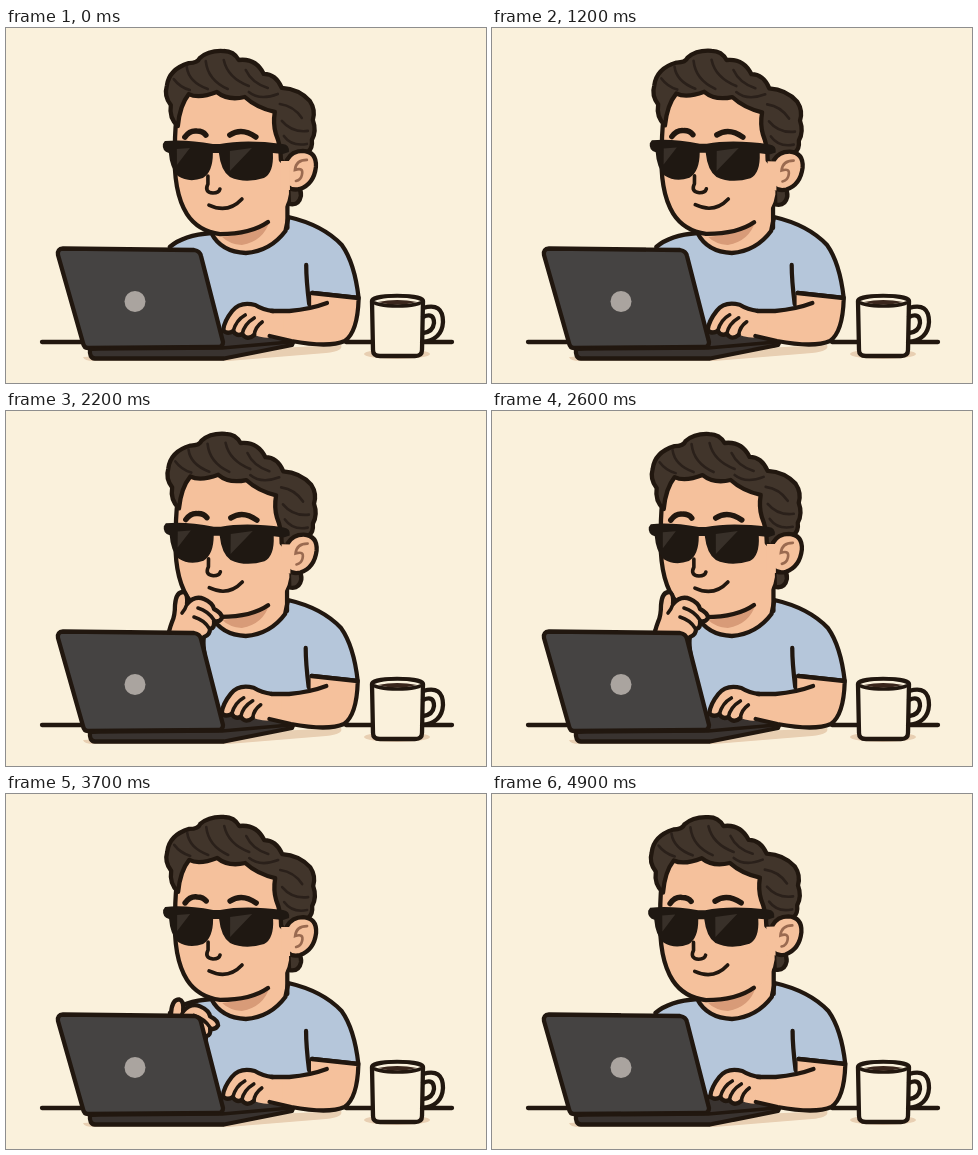
Write an HTML page that moves like this. It is 480 by 355 pixels and loops after 5 s.

```html
<!DOCTYPE html>
<html lang="en">
<head>
<meta charset="utf-8">
<title>Thinking at the laptop</title>
<style>
html, body { margin: 0; width: 100%; height: 100%; overflow: hidden; background: #faf1dc; }
svg { display: block; width: 100%; height: 100%; }
.ink { stroke: #21170f; stroke-width: 4.3; stroke-linecap: round; stroke-linejoin: round; }
.thin { stroke-width: 3.6; }
.brow { stroke-width: 5.5; }
.line { fill: none; }
.skin { fill: #f5c19c; }
.shirt { fill: #b5c6da; }
.hair { fill: #41352b; }
.cup { fill: #faf1dc; }
.dark { fill: #1f1812; }
.shade { fill: #d89b78; }
.shadow { fill: #e8cfb2; }
.strand { fill: none; stroke: #2a201a; stroke-width: 2.6; stroke-linecap: round; }
</style>
</head>
<body>
<svg viewBox="0 0 480 355">
  <path class="shadow" d="M77 329L335 317Q338 323 320 325L222 333H88Q78 333 77 329Z"/>
  <ellipse class="shadow" cx="391" cy="326" rx="33" ry="5"/>
  <path class="ink line" d="M36 314H80M340 314H446"/>

  <g class="body">
    <path class="skin" d="M204 160H282V206Q260 228 238 226Q216 222 204 200Z"/>
    <path class="shade" d="M216 209Q248 206 264 193Q258 213 236 217Q223 216 216 209Z"/>
    <path class="shirt ink" d="M163 219Q177 207 205 205Q215 224 240 225Q265 223 280 203L283 189Q318 197 337 217Q350 235 354 270L307 265L306 312H190Z"/>
    <path class="ink line" d="M282 174V200M301 237Q301 252 304 276"/>
  </g>

  <g id="head">
    <path class="hair ink" d="M282 150Q296 158 295 168Q293 178 283 176Z"/>
    <path class="skin" d="M176 55Q169 98 169 120Q167 164 181 186Q192 203 214 206Q246 207 270 190Q281 181 283 166V70Z"/>
    <path class="ink line" d="M172 80Q169 98 169 120Q167 164 181 186Q192 203 214 206Q245 206 262 194"/>
    <path class="hair ink" d="M172 98Q163 90 165 77Q158 68 161 58Q163 41 183 35Q192 35 194 30Q203 22 218 23Q228 23 233 32Q250 30 258 46Q270 46 276 60Q293 61 304 73Q310 82 307 92Q311 103 306 112Q307 120 302 124H292L281 138L275 132Q275 118 270 106Q267 96 269 84Q251 80 239 69Q222 73 211 64Q193 71 183 66Q174 77 172 98Z"/>
    <path class="strand" d="M168 51Q174 59 184 62M181 39Q183 54 202 61M200 33Q202 52 222 61M218 32Q222 50 243 58M240 42Q246 55 262 60M243 64Q254 73 272 66M274 76Q288 78 296 90M276 93Q286 105 302 103M278 108Q286 119 301 116"/>
    <path class="skin ink" d="M281 132Q286 123 297 123Q311 124 310 139Q308 156 294 161Q286 163 281 158Z"/>
    <path class="skin" d="M275 133H284V162H275Z"/>
    <path class="line" stroke="#9a6a50" stroke-width="2.6" stroke-linecap="round" d="M301 132Q290 132 289 142Q298 139 296 147Q295 152 290 153"/>
    <path class="ink line brow" d="M179 109Q184 102 191 103Q197 103 200 107M224 107Q236 99 250 109"/>
    <path class="dark" d="M159 113Q180 111 207 116H214Q239 111 277 116Q284 117 283 124L277 126L267 125Q268 145 258 150Q239 156 224 149Q215 143 213 125H207Q207 144 197 150Q183 155 172 148Q164 140 163 125Q156 123 157 116Z"/>
    <path fill="#383029" d="M171 121L184 120L171 137ZM224 123L246 120L224 143Z"/>
    <path class="ink line thin" d="M202 148V156Q198 164 207 165Q213 165 214 161M203 177Q222 186 236 171"/>
  </g>

  <g id="chinHand">
    <path class="skin ink" d="M158 260Q160 226 166 211Q169 205 169 194Q170 181 177 181Q182 182 181 193Q189 184 198 188Q207 192 208 198Q216 202 216 207Q213 212 208 210Q209 217 204 218Q204 224 198 226Q196 234 202 262Z"/>
    <path class="ink line thin" d="M181 193Q179 199 176 202M192 197Q202 200 208 209M188 206Q198 209 203 217"/>
  </g>

  <path class="ink cup" d="M366 273Q366 268 391 268Q417 268 417 273L416 322Q416 328 409 328H374Q367 328 367 322Z"/>
  <ellipse class="ink thin cup" cx="391.500" cy="273" rx="25" ry="5"/>
  <path fill="#3a261c" d="M372 274Q391 270 411 274Q391 279 372 274Z"/>
  <path class="ink line" d="M417 280Q437 274 437 294Q436 312 416 314M417 289Q428 284 428 295Q427 304 417 305"/>

  <path class="ink" fill="#393330" d="M84 321L210 303H284Q289 312 286 317L218 330.500H89Q83 330 84 321Z"/>
  <path class="ink" fill="#454342" d="M57 220.500L188 222Q194 223 195 228L217 314Q217 319 212 319L82 320Q78 320 77 315L52 227Q51 221 57 220.500Z"/>
  <path class="ink line thin" d="M85 321L216 320L284 314"/>
  <circle cx="129" cy="273.500" r="10.500" fill="#aaa49f"/>

  <g class="body">
    <path class="skin" d="M306 265L354 271Q353 304 340 313Q324 320 286 313L262 309L262 283Q290 283 306 278Z"/>
  </g>
  <g id="typeHand">
    <path class="skin" d="M276 284Q258 283 248 277Q233 273 225 283Q217 293 216 302Q220 307 226 303Q229 309 235 306Q240 313 247 307Q258 311 276 310Z"/>
    <path class="ink line" d="M266 283Q256 282 248 277Q233 273 225 283Q217 293 216 302Q220 307 226 303Q229 309 235 306Q240 313 247 307"/>
    <path class="ink line thin" d="M238 287Q229 292 226 303M247 290Q237 296 235 306M255 294Q248 299 247 307"/>
  </g>
  <g class="body">
    <path class="ink line" d="M354 271Q353 304 340 313Q324 320 286 313L264 308M322 275Q306 281 284 283L266 283M307 265L354 270"/>
  </g>
</svg>
<script>
const LOOP = 5000, STEP = 100, DROP = 62;
const $ = id => document.getElementById(id);
const bodies = document.querySelectorAll('.body');
const clamp = (v, lo, hi) => Math.min(hi, Math.max(lo, v));

// A wave with a whole number of cycles per loop, highest at time peak.
const wave = (t, cycles, peak) => Math.cos((t - peak) / LOOP * cycles * 2 * Math.PI);

function ease(t, from, to) {
  const u = clamp((t - from) / (to - from), 0, 1);
  return u * u * (3 - 2 * u);
}

function place(el, transform) { el.setAttribute('transform', transform); }

function draw(now) {
  const t = Math.floor(now % LOOP / STEP) * STEP;
  const tilt = .3 + 1.7 * wave(t, 5, 400) + wave(t, 3, 1700);
  const lowered = 1 - ease(t, 1200, 2000) + ease(t, 3400, 4100);
  const narrow = 1 - clamp(1.5 + 1.5 * tilt, 0, 3) / 124;
  const reach = 1 - 2.5 * tilt;

  place($('head'), `rotate(${tilt} 235 205)`);
  place($('chinHand'), `translate(${-25 * lowered ** 2} ${DROP * lowered})`);
  place($('typeHand'), `translate(${reach} ${Math.min(0, reach) * .7})`);
  bodies.forEach(b => place(b, `translate(230 0) scale(${narrow} 1) translate(-230 0)`));
  requestAnimationFrame(() => draw(performance.now()));
}
draw(0);
</script>
</body>
</html>
```
